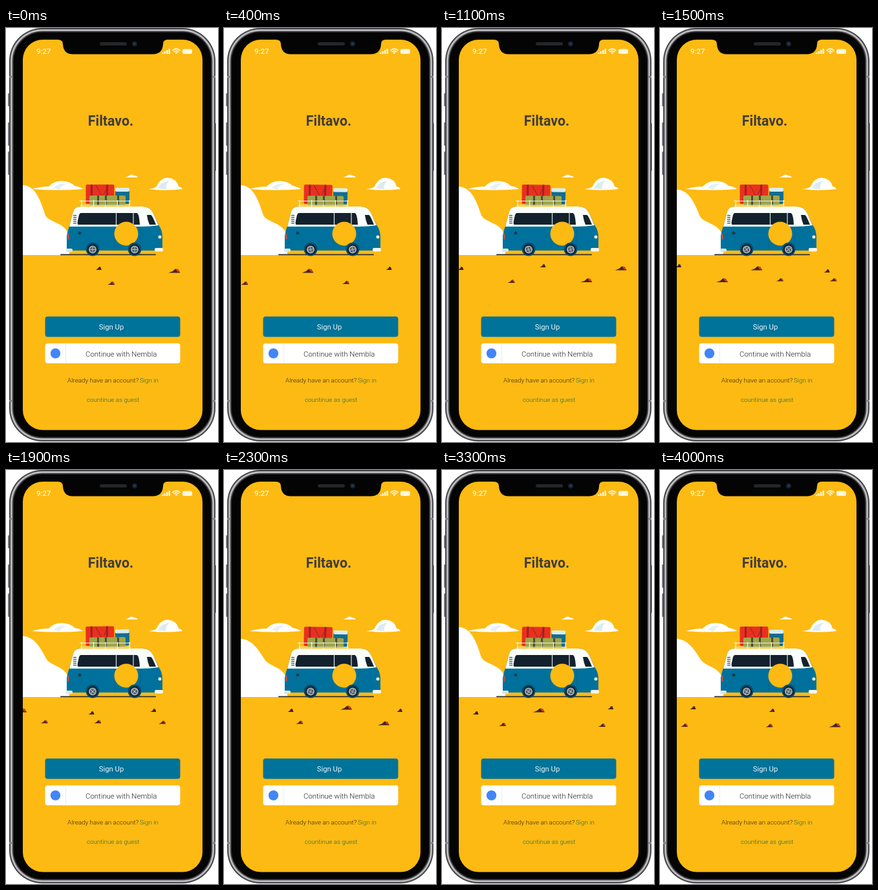
An HTML page with a canvas for the animation above (4.1 s loop, 328 by 640 pixels).

```html
<!DOCTYPE html>
<html lang="en">
<head>
<meta charset="utf-8">
<title>Travel app welcome screen</title>
<style>
  html, body { margin: 0; width: 100%; height: 100%; overflow: hidden; background: #fff; }
  canvas, svg { position: absolute; left: 0; top: 0; width: 328px; height: 640px; }
  text { font-family: Roboto, sans-serif; font-weight: 400; }
  .small { font-weight: 300; fill: #33270c; }
  .link { font-weight: 300; fill: #1f6a45; }
</style>
</head>
<body>
<canvas id="stage"></canvas>
<svg viewBox="0 0 328 640">
  <text x="47" y="40" font-size="11.5" style="font-weight:500" fill="#fff6dc">9:27</text>
  <text x="162" y="150.5" font-size="21.3" style="font-weight:600" text-anchor="middle" fill="#403c36">Filtavo.</text>
  <text x="163" y="466" font-size="11.3" text-anchor="middle" fill="#e8f6fb">Sign Up</text>
  <text x="123" y="508" font-size="11.4" style="font-weight:300" fill="#222">Continue with Nembla</text>
  <text x="95" y="548" font-size="9.9" class="small">Already have an account?</text>
  <text x="207" y="548" font-size="9.8" class="link">Sign in</text>
  <text x="165.7" y="578" font-size="9.8" text-anchor="middle" class="link">countinue as guest</text>
</svg>
<script>
const LOOP = 4100, STEP = 100, TURN = Math.PI * 2;
const YELLOW = '#fdba12', BLUE = '#00719c', NAVY = '#13212d', WHITE = '#fff', CREAM = '#fff6dc';
const canvas = document.getElementById('stage');
const ctx = canvas.getContext('2d');
const ratio = window.devicePixelRatio || 1;
canvas.width = 328 * ratio;
canvas.height = 640 * ratio;

function fill(path, color) {
  ctx.fillStyle = color;
  ctx.fill(typeof path === 'string' ? new Path2D(path) : path);
}
function stroke(path, color, width = 1) {
  ctx.strokeStyle = color;
  ctx.lineWidth = width;
  ctx.stroke(new Path2D(path));
}
function box(x, y, w, h, r, color) {
  const path = new Path2D();
  path.roundRect(x, y, w, h, r);
  fill(path, color);
  return path;
}
function disc(x, y, r, color) {
  const path = new Path2D();
  path.arc(x, y, r, 0, TURN);
  fill(path, color);
}

function drawPhone() {
  for (const y of [101, 146, 191]) box(3, y, 4, y === 101 ? 20 : 36, 1, '#77797c');
  box(321, 147, 4, 74, 1, '#77797c');
  ['#303134', '#8c8c8f', '#d6d6d8', '#707073', '#232325', '#040404'].forEach((color, i) => {
    const inset = i * 1.4;
    box(5 + inset, inset, 319 - inset * 2, 639 - inset * 2, 51 - inset, color);
  });
  for (const y of [74, 575]) {
    box(5, y, 5, 3, 0, '#85878a');
    box(319, y, 5, 3, 0, '#85878a');
  }
}

function drawNotch() {
  fill('M80 16 H250 V18 Q243 18 243 25 Q242 40.5 227 40.5 H103 Q89 40.5 88 25 Q88 18 80 18Z', '#040404');
  box(145, 22, 42, 5, 2.5, '#24272a');
  disc(199, 24.5, 4, '#17202d');
  disc(199, 24.5, 1.8, '#243d61');
}

function drawStatus() {
  for (let i = 0; i < 4; i++) box(241 + i * 3.5, 38 - i * 2, 2.5, 2 + i * 2, 0.5, CREAM);
  stroke('M257.5 35 Q263.5 29.5 269.5 35 M259.7 37 Q263.5 33.7 267.3 37', CREAM, 1.7);
  fill('M261.4 38 Q263.5 36.5 265.6 38 L263.5 40.3Z', CREAM);
  box(273, 32.5, 15, 7.5, 2, CREAM);
}

function drawClouds() {
  fill('M40 249 Q54 245 66 245 Q74 236 87 236.5 Q100 237 106 244 Q116 246 119 249 Q80 252 40 249Z', WHITE);
  fill('M74 247 Q82 239 93 241 Q84 245 83 250Z', '#e4f0f4');
  fill('M184 231 Q189 230 191 228 Q194 225 198 228 Q203 229 204 231Z', WHITE);
  fill('M220 249 Q230 248 233 245 Q239 231 251 231.5 Q264 233 267 245 Q272 246 273 249 Q246 252 220 249Z', WHITE);
  fill('M235 248 Q240 237 253 236 Q246 242 248 249Z', '#dcebf2');
}

// Dust billows at an ever faster pace through the loop.
function drawDust(t) {
  const surge = (1 - Math.cos(3.15 * Math.PI * (t / LOOP) ** 2)) / 2;
  const top = 243 + 18 * surge, waist = 290 + 3 * surge, x = 61 + 2 * surge;
  fill(`M26 ${top} C44 ${top + 1} ${x - 9} ${top + 18} ${x} ${waist}
    C${x + 8} ${waist + 12} 92 ${waist + 10} 98 ${waist + 32} V351 H26Z`, WHITE);
}

function drawLuggage(t) {
  const sway = Math.sin(t / 1000 * TURN);
  ctx.save();
  ctx.translate(146, 268);
  ctx.rotate(sway * 0.018);
  ctx.translate(-146, -268 + sway * 0.5);
  box(169, 248, 22, 24, 2, '#126d8f');
  box(169, 247, 22, 6, 2, '#d7eef0');
  box(123.5, 242, 44, 30, 2, '#e9301f');
  for (const x of [131, 155]) box(x, 242, 3, 30, 0, '#a51e22');
  stroke('M139 243 L148 259 M158 243 L151 258', '#8d2825');
  box(129, 259, 56, 15, 2, '#a0a549');
  for (const x of [141, 153, 172]) box(x, 259, 3, 15, 0, '#514c2d');
  ctx.restore();
  stroke('M114 267.5 H193 M115 274 H193', '#e6f3ef', 1.2);
  for (let x = 117; x < 194; x += 18.5) box(x - 0.6, 266, 1.3, 11, 0, '#e6f3ef');
}

function drawWheel(x, t) {
  disc(x, 342, 10.5, '#054e70');
  disc(x, 342.5, 8.3, NAVY);
  disc(x, 342.5, 6, '#a3aeb3');
  disc(x, 342.5, 4, '#4a5963');
  ctx.save();
  ctx.translate(x, 342.5);
  ctx.rotate(t / 90);
  stroke('M-4 0 H4 M0 -4 V4', '#b7c1c5');
  ctx.restore();
}

function drawVan(t) {
  box(84, 349.5, 148, 1.7, 0.8, '#33302b');
  fill('M104 284 Q106 276 116 276 H211 Q223 276 228 287 L237 306 Q242 313 242 324 V344 H94 V321 Q96 311 99 303Z', BLUE);
  fill('M104 284 Q106 276 116 276 H211 Q223 276 228 287 L236 305 Q223 307 208 307 H98Z', '#f9fdfb');
  fill('M116 286 H202 Q206 286 207 304 H112 Q110 304 111 298 L113 289 Q114 286 116 286Z', NAVY);
  fill('M218 289 H224 Q226 289 232 304 H222 Q219 297 218 289Z', NAVY);
  stroke('M170.5 285 V305 M197 285 V305', '#dbe7e6', 1.2);
  for (let y = 289; y < 302; y += 3) box(104, y, 5, 1.2, 0, '#344a55');
  stroke('M168 308 V343 M208 308 V343', '#086389', 0.8);
  disc(114, 317, 2.5, '#153d50');
  box(95, 318, 2, 9, 1, '#e6492d');
  disc(186, 318, 18.5, YELLOW);
  disc(238, 323, 2.5, '#e8f3ef');
  for (const x of [134, 199]) drawWheel(x, t);
  box(93, 341, 10, 5, 2, '#d9e5e6');
  box(230, 340, 13, 5.5, 2, '#f3f5ef');
}

function drawRock(x, y, w) {
  const h = w > 14 ? 3 : 2.4;
  ctx.save();
  ctx.translate(x, y);
  fill(`M${-w / 2} ${h} L${-w * 0.15} ${h * 0.2} L${w * 0.08} ${-h} L${w * 0.32} ${-h * 0.8} L${w / 2} ${h}Z`, '#472326');
  if (w > 9) fill(`M${w * 0.1} ${-h} L${w * 0.32} ${-h * 0.8} L${w / 2} ${h * 0.7} L${w * 0.26} ${h * 0.4}Z`, '#d4411f');
  ctx.restore();
}

// Two lanes of unevenly spaced rocks pass at a slightly falling speed.
function drawRoad(t) {
  const travel = 0.329 * t - 4e-6 * t * t;
  for (let i = 0; i < 13; i++) {
    const nearX = 63 + 119.3 * i + 46 * Math.cos((i - 3.4) / 7.5 * TURN);
    const farX = 180 + 105 * i + 38 * Math.cos((i - 4.8) / 10.5 * TURN);
    const nearY = 392 + 3 * Math.cos(i / 11 * TURN);
    const farY = 371.5 - 4 * Math.cos((i - 3) / 4 * TURN);
    drawRock(nearX - travel, nearY, i % 4 === 0 && i ? 18 : 11);
    drawRock(farX - travel, farY, i % 3 === 1 ? 18 : 9);
  }
}

function drawButtons() {
  box(60.5, 446, 209, 31.5, 4, '#00739a');
  box(60.5, 488.3, 209, 31, 4, '#e5a81a');
  box(60.5, 487.5, 209, 31, 4, WHITE);
  box(92, 488, 1, 30, 0, '#e9ebed');
  disc(76.5, 503, 7.7, '#4285f4');
}

function render(now) {
  const t = Math.floor((now % LOOP) / STEP) * STEP;
  ctx.setTransform(ratio, 0, 0, ratio, 0, 0);
  ctx.clearRect(0, 0, 328, 640);
  drawPhone();
  ctx.save();
  ctx.clip(box(26, 18, 278, 603.5, 31, YELLOW));
  drawClouds();
  drawDust(t);
  drawLuggage(t);
  drawVan(t);
  drawRoad(t);
  drawButtons();
  ctx.restore();
  drawNotch();
  drawStatus();
}

const start = performance.now();
function tick() {
  render(performance.now() - start);
  requestAnimationFrame(tick);
}
tick();
</script>
</body>
</html>
```
